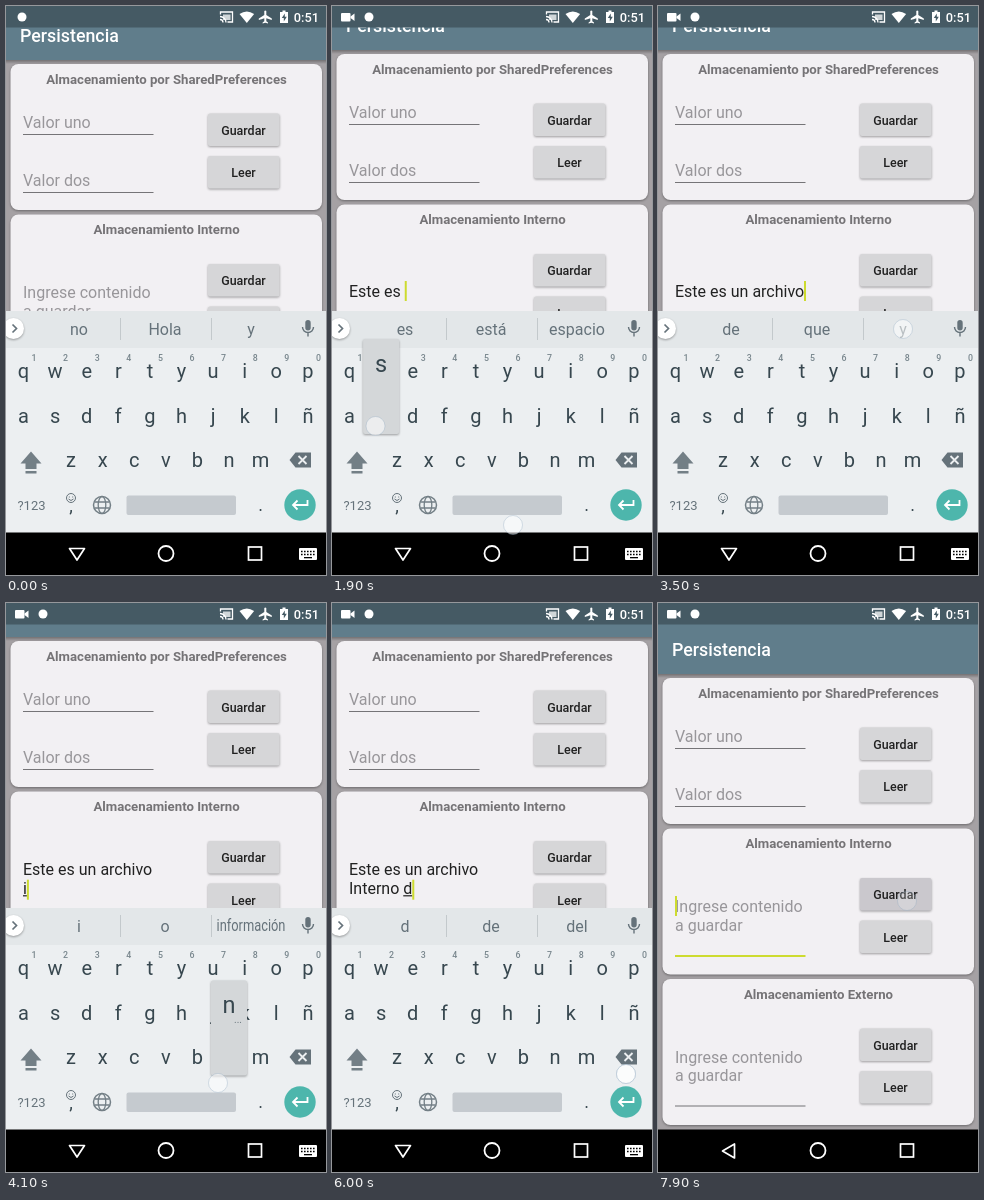
An HTML page for the animation above (8000 ms loop, 320x569 px).

```html
<!DOCTYPE html>
<html lang="es">
<head>
<meta charset="utf-8">
<title>Persistencia</title>
<style>
html, body { margin: 0; width: 100%; height: 100%; overflow: hidden; background: #000; }
svg { display: block; width: 320px; height: 569px; font-family: Roboto, "Noto Sans", sans-serif; }
text { white-space: pre; }
.shadow { filter: drop-shadow(0 1px 1px rgba(0, 0, 0, .35)); }
</style>
</head>
<body>
<svg id="stage" viewBox="0 0 320 569"></svg>
<script>
const LOOP = 8000, STEP = 100, TAP = 300;
const INK = '#37474f', MUTED = '#65727a', ACCENT = '#cddb2f', KEYS = '#eceff1';

function add(parent, tag, attrs = {}, label) {
  const node = document.createElementNS('http://www.w3.org/2000/svg', tag);
  set(node, attrs);
  if (label !== undefined) node.textContent = label;
  parent.append(node);
  return node;
}
function set(node, attrs) {
  for (const name in attrs) node.setAttribute(name, attrs[name]);
}
const group = (parent, attrs) => add(parent, 'g', attrs);
const rect = (parent, x, y, width, height, fill, more) =>
  add(parent, 'rect', { x, y, width, height, fill, ...more });
const circle = (parent, cx, cy, r, fill, more) => add(parent, 'circle', { cx, cy, r, fill, ...more });
const path = (parent, d, fill, more) => add(parent, 'path', { d, fill, ...more });
const line = (parent, d, stroke, width = 1.5, more) =>
  path(parent, d, 'none', { stroke, 'stroke-width': width, ...more });
const write = (parent, x, y, size, fill, label, more) =>
  add(parent, 'text', { x, y, 'font-size': size, fill, ...more }, label);
const mid = { 'text-anchor': 'middle' };
const show = (node, on) => set(node, { visibility: on ? 'visible' : 'hidden' });

const pen = document.createElement('canvas').getContext('2d');
function widthOf(label) {
  pen.font = '16px Roboto, "Noto Sans", sans-serif';
  return pen.measureText(label).width;
}

// App screen
const stage = document.getElementById('stage');
const defs = add(stage, 'defs');
const fade = add(defs, 'linearGradient', { id: 'fade', x2: 0, y2: 1 });
add(fade, 'stop', { 'stop-color': '#000', 'stop-opacity': .3 });
add(fade, 'stop', { offset: 1, 'stop-color': '#000', 'stop-opacity': 0 });

rect(stage, 0, 0, 320, 569, '#a5a1a4');
const app = group(stage);
rect(app, 0, 0, 320, 71, '#607d8b');
rect(app, 0, 71, 320, 4, 'url(#fade)');
write(app, 14, 53, 17.8, '#fff', 'Persistencia', { 'font-weight': 500 });

function button(y, label) {
  const face = rect(app, 202, y, 71.5, 32.5, '#d6d6d8', { rx: 2, class: 'shadow' });
  write(app, 237.5, y + 21, 12.44, '#212121', label, { ...mid, 'font-weight': 500 });
  return face;
}
function card(y, title) {
  rect(app, 4.5, y, 311.5, 146, '#f2f0f3', { rx: 8, class: 'shadow' });
  write(app, 160.5, y + 19.5, 13.2, '#757376', title, { ...mid, 'font-weight': 700 });
  const save = button(y + 49.5, 'Guardar');
  button(y + 92, 'Leer');
  return save;
}
const hint = (parent, y, label) => write(parent, 17, y, 16, '#98969a', label);
const rule = y => rect(app, 17, y, 130.5, 1, '#757477');

card(75, 'Almacenamiento por SharedPreferences');
hint(app, 139, 'Valor uno');
rule(145);
hint(app, 197, 'Valor dos');
rule(203);
const saveFace = card(225.5, 'Almacenamiento Interno');
const prompt = group(app);
rect(app, 17, 352, 130.5, 2, ACCENT);
card(376, 'Almacenamiento Externo');
for (const [box, y] of [[prompt, 309], [app, 459.5]]) {
  hint(box, y, 'Ingrese contenido');
  hint(box, y + 18.7, 'a guardar');
}
rule(502.5);
const typed = [0, 1].map(() => write(app, 17, 0, 16, '#212121', ''));
const underline = rect(app, 0, 0, 0, 1.2, '#212121');
const caret = rect(app, 0, 0, 2, 20, ACCENT);

// Status bar
rect(stage, 0, 0, 320, 21.5, '#455a64');
const camera = group(stage);
rect(camera, 9, 7, 9.5, 8.5, '#fff', { rx: 1 });
path(camera, 'M18.5 10.5l4-3v7.5l-4-3z', '#fff');
const badge = circle(stage, 37, 11, 4.5, '#fff');
line(stage, 'M214.5 8.5v-2.500h12v10h-5M214 10.500a6 6 0 0 1 6 6M214 13.500a3 3 0 0 1 3 3', '#fff', 1.3);
rect(stage, 217, 8.500, 7.500, 5.500, '#fff', { opacity: .75 });
path(stage, 'M233.500 8q7.300 -5 14.600 0l-7.300 9z', '#fff');
path(stage, 'M258.300 5q1 -1.200 2 0v4l5.500 3.500v1.500l-5.500 -1.700v3l1.700 1.200v1l-2.700 -.8l-2.700 .8v-1l1.700 -1.200v-3l-5.500 1.700v-1.500l5.500 -3.500z', '#fff');
path(stage, 'M274 6h2.500v-1.500h3v1.500h2.500v11h-8z', '#fff');
path(stage, 'M278.800 7.500l-3 4.500h2v3.500l3 -4.700h-2z', '#455a64');
write(stage, 313, 15.500, 12.8, '#fff', '0:51', { 'text-anchor': 'end', 'font-weight': 500 });

// Keyboard
const board = group(stage);
rect(board, 0, 305, 320, 222, KEYS);
rect(board, 0, 305, 320, 37, '#e3e7e9');
circle(board, 7.5, 322.5, 10.5, '#fff', { class: 'shadow' });
line(board, 'M6.500 318.500l4 4l-4 4', MUTED, 1.7);
rect(board, 299.300, 314, 5.400, 10.500, MUTED, { rx: 2.700 });
line(board, 'M296.500 321a5.500 5.500 0 0 0 11 0M302 326.500v4', MUTED, 1.4);
const bars = group(board);
for (const x of [114, 205]) rect(bars, x, 312, 1, 22, '#c3c9cc');
const slots = [73, 159, 245].map(x =>
  write(group(board, { transform: `translate(${x} 0)` }), 0, 328.500, 16, MUTED, '', mid));

const keyAt = { ' ': [175, 499], '.': [254.500, 499] };
const letters = [];
[['qwertyuiop', 17.5, 366], ['asdfghjklñ', 17.5, 411], ['zxcvbnm', 65, 455.500]].forEach(([row, x0, y]) => {
  [...row].forEach((key, i) => {
    const x = x0 + i * 31.6;
    keyAt[key] = [x, y];
    letters.push([write(board, x, y + 5.800, 20, INK, key, mid), key]);
    if (y === 366) write(board, x + 10.500, 355, 8.8, '#78868d', (i + 1) % 10, { ...mid, 'font-weight': 500 });
  });
});
path(board, 'M25 445.500l10.500 12h-5v5.500h-11v-5.500h-5z', '#737f86');
rect(board, 19.500, 465, 11, 2.500, '#737f86');
path(board, 'M283.500 454l6 -7.500h15.500v15h-15.500z', MUTED);
line(board, 'M292.500 450l8 8m0 -8l-8 8', KEYS, 1.8);
write(board, 25.500, 504, 13, MUTED, '?123', mid);
circle(board, 65, 492, 4.500, 'none', { stroke: MUTED });
line(board, 'M62.500 493q2.500 3 5 0M63.300 490.500v1M66.700 490.500v1', MUTED, 1);
write(board, 65, 506, 18, INK, ',', mid);
circle(board, 96, 499, 8.500, 'none', { stroke: '#737f86', 'stroke-width': 1.500 });
add(board, 'ellipse', { cx: 96, cy: 499, rx: 3.800, ry: 8.500, fill: 'none', stroke: '#737f86', 'stroke-width': 1.3 });
line(board, 'M88.500 496h15M88.500 502h15', '#737f86', 1.3);
rect(board, 120.500, 489.500, 109.500, 19.500, '#c5cacf', { rx: 2 });
write(board, 254.500, 505, 18, INK, '.', mid);
circle(board, 294, 499, 15.700, '#4db6ac');
line(board, 'M301.500 494v5h-14.500m4.500 -4.500l-4.500 4.500l4.500 4.500', '#fff', 1.8);
const popups = group(stage);

// Navigation bar
rect(stage, 0, 526.500, 320, 43, '#000');
const ripple = rect(stage, 24, 527, 94.500, 42, '#2c2c2c', { rx: 20 });
const navLine = { 'stroke-linejoin': 'round' };
const backDown = line(stage, 'M63.500 542.500h15l-7.500 11.500z', '#fff', 1.700, navLine);
const backLeft = line(stage, 'M76.500 541v14l-12 -7z', '#fff', 1.700, navLine);
circle(stage, 160, 547.500, 7.500, 'none', { stroke: '#fff', 'stroke-width': 1.800 });
rect(stage, 242.500, 541, 13, 13, 'none', { stroke: '#fff', 'stroke-width': 1.700 });
const imeIcon = group(stage);
rect(imeIcon, 293, 542, 18, 12, '#fff', { rx: 1 });
line(imeIcon, 'M295 545.500h14M295 548.500h14', '#000', 1.600, { 'stroke-dasharray': '1.6 1.4' });
rect(imeIcon, 298, 551, 8, 1.300, '#000');
const dots = group(stage);

// [time, text, underlined tail, suggestions]
const edits = [
  [0, '', 0, 'no Hola y'],
  [700, 'E', 1, 'E El En'],
  [800, 'Es', 2, 'Es Está Este'],
  [1000, 'Est', 3, 'Est Esta Este'],
  [1200, 'Este', 4, 'Este Esté Estel'],
  [1400, 'Este ', 0, 'es año tipo'],
  [1600, 'Este e', 1, 'es está espacio'],
  [1800, 'Este es', 2, 'es está espacio'],
  [1900, 'Este es ', 0, 'es está espacio'],
  [2000, 'Este es ', 0, 'un el una'],
  [2100, 'Este es u', 1, 'u un una'],
  [2300, 'Este es un', 2, 'un una uno'],
  [2500, 'Este es un ', 0, 'poco día buen'],
  [2700, 'Este es un a', 1, 'a al archivo'],
  [2900, 'Este es un ae', 2, 'ae *se archivo'],
  [3100, 'Este es un aec', 3, 'aec *sec archivo'],
  [3500, 'Este es un archivo ', 0, 'de que y'],
  [3800, 'Este es un archivo\ni', 1, 'i o información'],
  [4200, 'Este es un archivo\nin', 2, 'in un información'],
  [4400, 'Este es un archivo\nint', 3, 'int interno internet'],
  [4600, 'Este es un archivo\ninte', 4, 'inte interno internet'],
  [4700, 'Este es un archivo\ninter', 5, 'inter interno internet'],
  [4800, 'Este es un archivo\nintern', 6, 'intern *Interno interna'],
  [5000, 'Este es un archivo\ninterno', 7, 'interno *Interno internos'],
  [5100, 'Este es un archivo\nInterno ', 0, 'de y en'],
  [5300, 'Este es un archivo\nInterno d', 1, 'd de del'],
  [5500, 'Este es un archivo\nInterno de', 2, 'de del desde'],
  [5900, 'Este es un archivo\nInterno d', 1, 'd de del'],
  [6100, 'Este es un archivo\nInterno ', 0, 'de y en'],
  [6400, 'Este es un archivo\nInterno', 0, 'Interno Interna Internos'],
  [6600, 'Este es un archivo\nInterno.', 0, 'y de en'],
  [6700, 'Este es un archivo\nInterno.', 0, ''],
  [7900, '', 0, '']
];

// [time, key, optional touch point]
const taps = [
  [600, 'e'], [700, 's'], [900, 't'], [1100, 'e'], [1300, ' '],
  [1500, 'e'], [1700, 's', 43.5, 420], [1800, ' ', 181, 519],
  [2000, 'u'], [2200, 'n'], [2400, ' '], [2600, 'a'],
  [2800, 'e', 91, 372], [3000, '', 115.5, 455], [3400, '', 245, 323],
  [3700, 'i'], [4100, 'n', 212, 480], [4300, 't'], [4500, 'e'], [4600, 'r'],
  [4700, 'n'], [4900, 'o'], [5000, ' ', 175, 489], [5200, 'd'], [5300, 'e'],
  [5800, '', 294, 471], [6000, '', 294, 471], [6300, '', 294, 471],
  [6400, '.', 254, 520], [7000, '', 47, 560], [7800, '', 249, 298]
];

// Value of the last row whose time has passed
const at = (rows, t) => rows.findLast(row => row[0] <= t);

function popup(key, capital) {
  const [x, y] = keyAt[key];
  rect(popups, x - 18, y - 78, 36, 95, '#d4d7d9', { rx: 2, class: 'shadow' });
  write(popups, x, y - 45.500, 23.500, INK, capital ? key.toUpperCase() : key, mid);
  if ('aeioun'.includes(key)) write(popups, x + 9, y - 36, 10, MUTED, '...', mid);
}

function drawField(t) {
  const [since, text, tail] = at(edits, t);
  const lines = text.split('\n');
  const top = lines.length > 1 || !text ? 309 : 318;
  typed.forEach((node, i) => {
    node.textContent = lines[i] || '';
    set(node, { y: top + i * 18.700 });
  });
  show(prompt, !text);
  const last = lines[lines.length - 1];
  const base = top + (lines.length - 1) * 18.700;
  const end = 17 + widthOf(last);
  const start = 17 + widthOf(last.slice(0, last.length - tail));
  set(underline, { x: start, y: base + 1.500, width: tail ? end - start : 0 });
  set(caret, { x: Math.min(end, 146), y: base - (lines.length > 1 ? 14 : 16) });
  show(caret, t >= 700 && (t - since) % 1000 < 500);
}

function drawSuggestions(t) {
  const words = at(edits, t)[3].split(' ');
  show(bars, words.length > 1);
  slots.forEach((node, i) => {
    const word = words[i] || '', bold = word[0] === '*', label = word.replace('*', '');
    node.textContent = label;
    set(node, {
      fill: bold ? '#000' : MUTED,
      'font-weight': bold ? 700 : 400,
      transform: `scale(${Math.min(1, 69 / Math.max(1, widthOf(label)))} 1)`
    });
  });
}

function drawTaps(t) {
  popups.replaceChildren();
  dots.replaceChildren();
  for (const [time, key, x, y] of taps) {
    if (t < time || t >= time + TAP) continue;
    const [kx, ky] = keyAt[key] || [];
    if (/[a-zñ]/.test(key)) popup(key, time === 600);
    circle(dots, x ?? kx, y ?? ky + 8, 9.500, '#fff', {
      'fill-opacity': t < 7000 ? .55 : t < 7800 ? .5 : .2,
      stroke: '#8fa9c0', 'stroke-opacity': .35
    });
  }
}

function draw(t) {
  const scroll = at([[0, 17], [700, 27], [3800, 37], [7300, 0]], t)[1];
  set(app, { transform: `translate(0 ${-scroll})` });
  show(camera, t >= 100);
  set(badge, { cx: t < 100 ? 16 : 37 });
  drawField(t);
  drawSuggestions(t);
  drawTaps(t);
  const capital = t >= 300 && t < 700;
  for (const [node, key] of letters) node.textContent = capital ? key.toUpperCase() : key;

  const leaving = t >= 7300;
  set(board, { transform: `translate(0 ${leaving ? 90 : 0})`, opacity: leaving ? .5 : 1 });
  show(board, t < 7400);
  show(backDown, t < 7200);
  show(imeIcon, t < 7200);
  show(backLeft, t >= 7200);
  set(ripple, { opacity: at([[0, 0], [7000, .4], [7100, .8], [7200, 1], [7400, .6], [7500, .3], [7600, 0]], t)[1] });
  set(saveFace, { fill: t >= 7900 ? '#cac8cd' : '#d6d6d8' });
}

const begin = performance.now();
let shown = -1;
function tick() {
  const t = Math.floor((performance.now() - begin) % LOOP / STEP) * STEP;
  if (t !== shown) draw(shown = t);
  requestAnimationFrame(tick);
}
tick();
</script>
</body>
</html>
```
